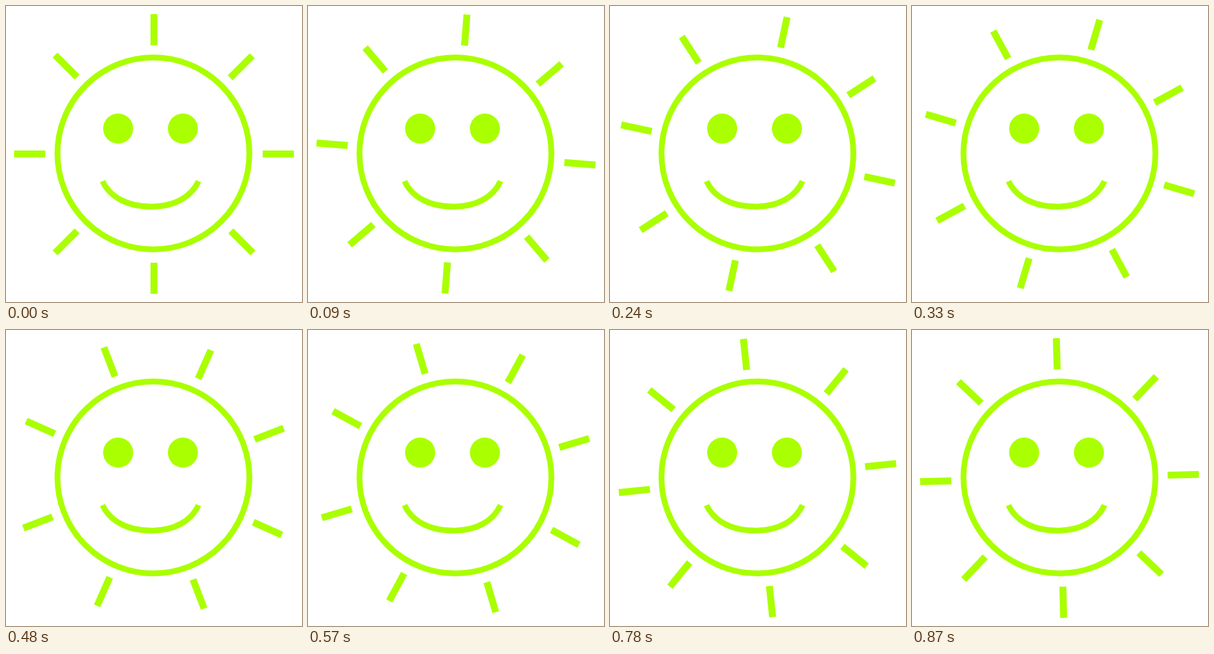
Write an HTML page that moves like this. It is 512 px wide and 512 px high and loops after 0.9 s.

```html
<!DOCTYPE html>
<html lang="en">
<head>
<meta charset="utf-8">
<title>Smiling sun</title>
<style>
  html, body { margin: 0; height: 100%; overflow: hidden; background: #fff; }
  svg { display: block; width: 100vw; height: 100vh; }
</style>
</head>
<body>
<svg viewBox="0 0 512 512" fill="none" stroke="#af0" stroke-width="10">
  <g id="rays" stroke-width="12"></g>
  <circle cx="255" cy="255" r="166"/>
  <g fill="#af0" stroke="none">
    <circle cx="194" cy="212" r="26"/>
    <circle cx="306" cy="212" r="26"/>
  </g>
  <path d="M167 303C180 331 211 347 251 347S320 331 333 303"/>
</svg>
<script>
  const LOOP = 900, STEP = 30, RAY_ANGLE = 45;
  const rays = document.getElementById('rays');

  // The upper right ray sits slightly closer to the face.
  rays.innerHTML = Array.from({ length: 8 }, (_, i) => {
    const inset = i === 1 ? 1.7 : 0;
    return `<path d="M256 ${14 + inset}v54" transform="rotate(${i * RAY_ANGLE} 256 256)"/>`;
  }).join('');

  function draw(now) {
    const time = Math.floor(now % LOOP / STEP) * STEP;
    rays.setAttribute('transform', `rotate(${time / LOOP * RAY_ANGLE} 256 256)`);
    requestAnimationFrame(draw);
  }
  draw(0);
</script>
</body>
</html>
```
